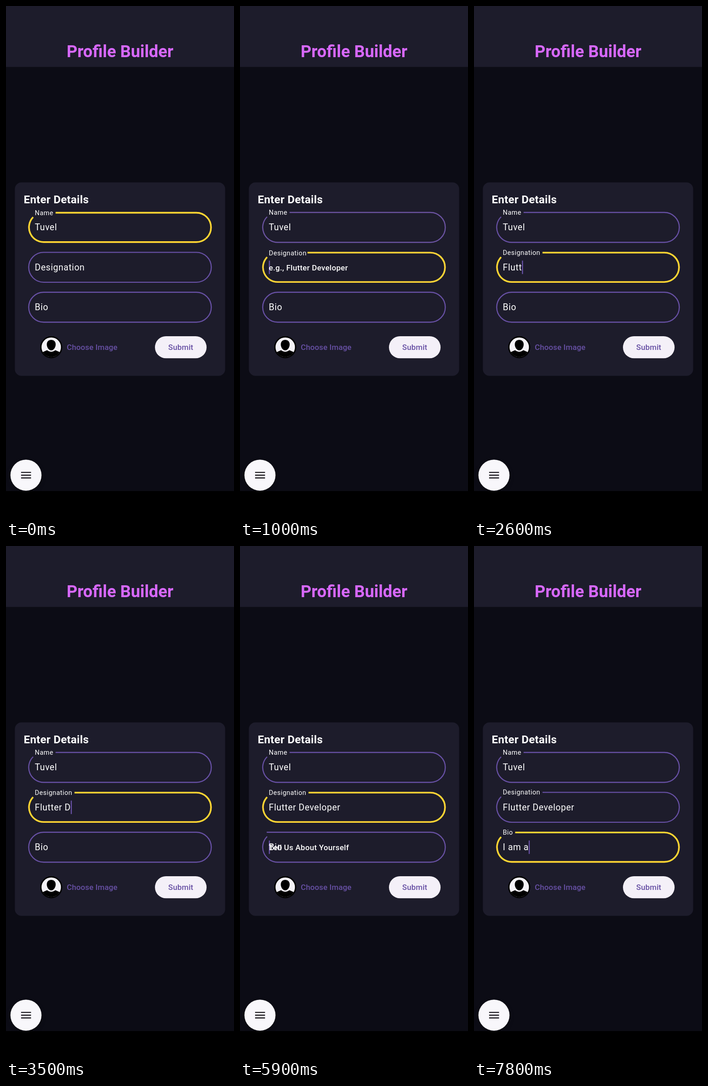
An HTML page that plays this animation: 499x1121 px, repeating every 8000 ms.

```html
<!DOCTYPE html>
<html lang="en">
<head>
<meta charset="utf-8">
<title>Profile Builder</title>
<style>
  html, body { margin: 0; width: 100%; height: 100%; overflow: hidden; background: #0c0c15; }
  svg { display: block; width: 499px; height: 1121px; }
  text { font-family: Roboto, sans-serif; white-space: pre; fill: #fff; }
  .title { font-size: 36.4px; font-weight: 700; fill: #d768fd; text-anchor: middle; }
  .heading { font-size: 24.26px; font-weight: 700; letter-spacing: .28px; }
  .body { font-size: 19.4px; letter-spacing: .6px; }
  .hint { font-size: 17px; font-weight: 500; letter-spacing: .3px; }
  .button { font-size: 17px; font-weight: 500; letter-spacing: .12px; fill: #6750a4; }
  .border { fill: none; }
  .caret { fill: #6750a4; }
  .fab { filter: drop-shadow(0 4px 5px rgba(0, 0, 0, .3)); }
</style>
</head>
<body>
<svg viewBox="0 0 499 1121">
  <defs>
    <clipPath id="face"><circle cx="99" cy="747" r="21.5"/></clipPath>
  </defs>
  <rect width="499" height="1121" fill="#0c0c15"/>
  <rect width="499" height="133.5" fill="#1d1c2b"/>
  <rect y="1062" width="499" height="59" fill="#000"/>
  <text class="title" x="249.5" y="112">Profile Builder</text>

  <rect x="19.4" y="386.3" width="460.2" height="423.5" rx="14.5" fill="#1d1c2b"/>
  <text class="heading" x="38.8" y="432">Enter Details</text>
  <g id="fields"></g>

  <circle cx="99" cy="747" r="24.2" fill="#000"/>
  <circle cx="99" cy="747" r="21.3" fill="#f4f2f7"/>
  <g clip-path="url(#face)">
    <path d="M99 731c6 0 9.700 4 9.700 10c0 6.500-4.500 13-9.700 13s-9.700-6.500-9.700-13c0-6 3.700-10 9.700-10z"/>
    <path d="M76 772v-10c3-4 8-6 14-8.500c5 4.500 13 4.500 18 0c6 2.500 11 4.500 14 8.500v10z"/>
  </g>
  <text class="button" x="133" y="753">Choose Image</text>
  <rect x="326" y="723" width="113" height="48.300" rx="24.150" fill="#f4f0f8"/>
  <text class="button" x="382.500" y="753" text-anchor="middle">Submit</text>

  <circle class="fab" cx="43.700" cy="1027.200" r="34" fill="#f8f7fb"/>
  <path d="M33 1021.100h21.800m-21.800 6.100h21.800m-21.800 6.100h21.800" stroke="#1d1b20" stroke-width="2.430"/>
</svg>
<script>
const LOOP = 8000, STEP = 100, FADE = 200;
const LEFT = 48.5, RIGHT = 450.5, TOP = 450.8, PITCH = 87.35, HEIGHT = 67.9;
const TEXT_X = 63.1, GAP_PAD = 4.85, CUT_X = 59.4;
const PURPLE = [103, 80, 164], YELLOW = [255, 214, 51];

// at: focus time, lag: delay of the label motion, keys: time of each typed letter
const fields = [
  { label: 'Name', hint: '', text: 'Tuvel', at: -600, lag: 0, keys: [] },
  { label: 'Designation', hint: 'e.g., Flutter Developer', text: 'Flutter Developer', at: 800, lag: 40,
    keys: [1800, 2000, 2300, 2500, 2600, 2700, 2900, 3100, 3500,
           3700, 3800, 3900, 4300, 4500, 4600, 4700, 4900] },
  { label: 'Bio', hint: 'Tell Us About Yourself', text: 'I am a', at: 5900, lag: -10,
    keys: [6700, 6900, 7000, 7100, 7300, 7800] }
];

const mix = (a, b, p) => a + (b - a) * p;
const clamp = x => Math.min(1, Math.max(0, x));

// cubic-bezier(.4, 0, .2, 1)
function ease(x) {
  x = clamp(x);
  if (x === 0 || x === 1) return x;
  let lo = 0, hi = 1;
  for (let i = 0; i < 24; i++) {
    const s = (lo + hi) / 2, r = 1 - s;
    if (1.2 * r * r * s + .6 * r * s * s + s * s * s < x) lo = s; else hi = s;
  }
  return lo * lo * (3 - 2 * lo);
}

function add(parent, tag, attrs, text) {
  const el = document.createElementNS('http://www.w3.org/2000/svg', tag);
  set(el, attrs);
  if (text !== undefined) el.textContent = text;
  return parent.appendChild(el);
}

function set(el, attrs) {
  for (const k in attrs) el.setAttribute(k, attrs[k]);
}

const show = (el, on) => set(el, { visibility: on ? 'visible' : 'hidden' });

function build(f, i) {
  const root = document.getElementById('fields');
  f.top = TOP + PITCH * i;
  f.base = f.top + HEIGHT / 2 + 6.6;
  f.border = add(root, 'path', { class: 'border' });
  f.caret = add(root, 'rect', { class: 'caret', y: f.top + 19.3, width: 2.4, height: 29.4 });
  f.hintEl = add(root, 'text', { class: 'hint', x: TEXT_X, y: f.base }, f.hint);
  f.value = add(root, 'text', { class: 'body', x: TEXT_X, y: f.base }, '');
  f.value.setAttribute('xml:space', 'preserve');
  f.labelEl = add(root, 'text', { class: 'body' }, f.label);
  f.labelWidth = f.labelEl.getComputedTextLength() * .75;
}

function outline(f, width, float) {
  const h = width / 2, top = f.top + h, bottom = f.top + HEIGHT - h;
  const r = (bottom - top) / 2, cy = top + r;
  const x1 = LEFT + h + r, x2 = RIGHT - h - r;
  const right = `H${x2}A${r} ${r} 0 0 1 ${x2} ${bottom}H${x1}`;
  if (!float) return `M${x1} ${top}${right}A${r} ${r} 0 0 1 ${x1} ${top}Z`;
  const start = TEXT_X - GAP_PAD + (f.labelWidth + 2 * GAP_PAD) * float;
  const cutY = cy - Math.sqrt(r * r - (x1 - CUT_X) ** 2);
  return `M${start} ${top}${right}A${r} ${r} 0 0 1 ${CUT_X} ${cutY}`;
}

function draw(f, i, t) {
  const next = fields[i + 1];
  const phase = g => ease((t - g.at - g.lag) / FADE);
  const float = phase(f);
  const focus = float - (next ? phase(next) : 0);
  const width = mix(2.4, 3.6, focus);
  const color = PURPLE.map((c, k) => Math.round(mix(c, YELLOW[k], focus)));
  set(f.border, { d: outline(f, width, float), 'stroke-width': width, stroke: `rgb(${color})` });

  const y = mix(f.base, f.top + width / 2 + 5, float);
  set(f.labelEl, { transform: `translate(${TEXT_X} ${y}) scale(${mix(1, .75, float)})` });

  const typed = f.keys.filter(k => k <= t);
  const text = f.keys.length ? f.text.slice(0, typed.length) : f.text;
  if (f.value.textContent !== text) f.value.textContent = text;

  const active = t >= f.at && (!next || t < next.at);
  const since = t - (typed.length ? typed[typed.length - 1] : f.at);
  show(f.hintEl, active && !text);
  show(f.caret, active && since % 1000 < 500);
  set(f.caret, { x: TEXT_X + (text ? f.value.getComputedTextLength() : 0) });
}

function frame() {
  const t = Math.floor(performance.now() % LOOP / STEP) * STEP;
  fields.forEach((f, i) => draw(f, i, t));
  requestAnimationFrame(frame);
}

fields.forEach(build);
frame();
</script>
</body>
</html>
```
